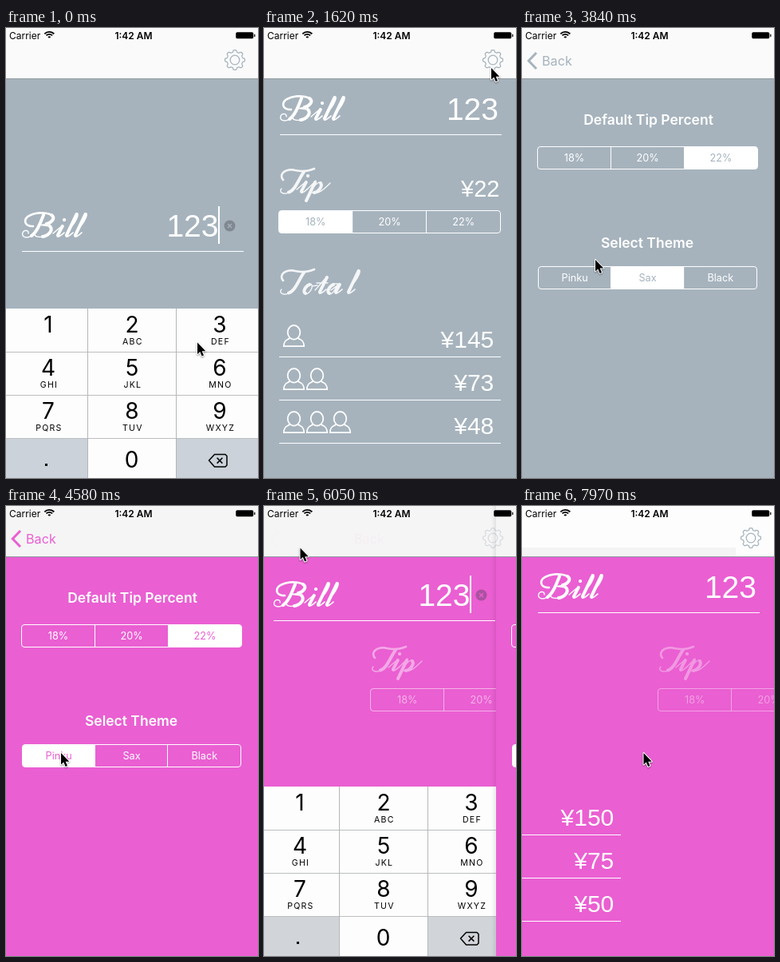
An HTML page with a canvas for the animation above (8 s loop, 316 by 563 pixels).

```html
<!DOCTYPE html>
<html lang="en">
<head>
<meta charset="utf-8">
<title>Tip calculator</title>
<style>
html, body { margin: 0; width: 100%; height: 100%; overflow: hidden; background: #a6b3bd; }
canvas { display: block; width: 316px; height: 563px; }
</style>
</head>
<body>
<canvas id="stage"></canvas>
<script>
const W = 316, H = 563, LOOP = 8000, TICK = 147.5;
const SAX = '#a6b3bd', PINK = '#ea5fd2', WHITE = '#fff';
const UI = 'Inter, Roboto, sans-serif', NUM = '"Liberation Sans", Arial, sans-serif';
const canvas = document.getElementById('stage');
const c = canvas.getContext('2d');
const dpr = window.devicePixelRatio || 1;
canvas.width = W * dpr;
canvas.height = H * dpr;

const PUSH = 12.4, TIP_CHOSEN = 22, THEME_CHOSEN = 29, THEMED = 30, POP = 38.4, BACK = 39, SECOND_TAP = 50;

// cubic-bezier(.42, 0, .58, 1)
function ease(x) {
  if (x <= 0) return 0;
  if (x >= 1) return 1;
  let lo = 0, hi = 1;
  for (let i = 0; i < 24; i++) {
    const u = (lo + hi) / 2, v = 1 - u;
    if (1.26 * u * v * v + 1.74 * u * u * v + u * u * u < x) lo = u; else hi = u;
  }
  return lo * lo * (3 - 2 * lo);
}

const span = (n, start, length) => ease((n - start) / length);

// Critically damped spring used by page transitions
function spring(t) {
  if (t <= 0) return 0;
  const rest = (1 + 1.6 * t) * Math.exp(-1.6 * t);
  return rest < .01 ? 1 : 1 - rest;
}

function text(s, x, y, font, color, align = 'center') {
  c.font = font;
  c.fillStyle = color;
  c.textAlign = align;
  c.fillText(s, x, y);
}

function rect(x, y, w, h, color) {
  c.fillStyle = color;
  c.fillRect(x, y, w, h);
}

function stroke(color, width) {
  c.strokeStyle = color;
  c.lineWidth = width;
  c.stroke();
}

function disc(x, y, r, color) {
  c.beginPath();
  c.arc(x, y, r, 0, 7);
  c.fillStyle = color;
  c.fill();
}

function shifted(x, y, alpha, draw) {
  if (alpha <= 0) return;
  c.save();
  c.translate(Math.round(x), Math.round(y));
  c.globalAlpha *= alpha;
  draw();
  c.restore();
}

// Script lettering: thin connecting lines plus heavy slanted stems, baseline at y = 0.
// Each word is rendered once so that fading does not reveal overlaps.
function lettering(draw) {
  const layer = document.createElement('canvas');
  layer.width = 260 * dpr;
  layer.height = 120 * dpr;
  const g = layer.getContext('2d');
  g.scale(2 * dpr, 2 * dpr);
  g.translate(0, 40);
  g.strokeStyle = WHITE;
  g.lineCap = g.lineJoin = 'round';
  const line = (d, w) => {
    g.lineWidth = w;
    g.stroke(new Path2D(d));
  };
  draw({
    thin: d => line(d, 1.4),
    mid: d => line(d, 2.6),
    heavy: d => line(d, 4),
    dot: (x, y) => line(`M${x} ${y}h.1`, 4),
    stem(x, h) {
      const top = x + .45 * h;
      line(`M${top} ${1 - h}L${x + 1} -3`, 4);
      line(`M${x} -3Q${x - .5} 2.5 ${x + 9} -6`, 1.6);
      line(h > 25 ? `M${x + 3} -9C${top + 1} -20 ${top + 4} ${-h - 2} ${top} ${-h}` : `M${x - 5} -5L${top} ${-h}`, 1.4);
    }
  });
  return layer;
}

function capitalT(pen) {
  pen.mid('M24 -17C18 -24 27 -32 39 -29C48 -27 56 -28 63 -31');
  pen.heavy('M50 -27C43 -17 39 -4 31 -1.5');
  pen.thin('M31 -1C24 2 18 -2 22 -6');
}

const words = {
  bill: lettering(pen => {
    pen.heavy('M47 -28C43 -18 39 -7 32 -2M57 -28C63 -24 56 -18 51 -17M55 -14C60 -9 53 -2 46 -1');
    pen.thin('M32 -2C25 2 19 -1 21 -6C23 -10 29 -9 28 -5M46 -1C41 0 36 -1 36 -4M51 -17L44 -15.5L55 -14');
    pen.mid('M34 -14C23 -13 20 -24 31 -28C40 -32 52 -31 57 -28');
    pen.stem(64, 15);
    pen.dot(73, -22);
    pen.stem(75, 30);
    pen.stem(86, 30);
  }),
  tip: lettering(pen => {
    capitalT(pen);
    pen.stem(46, 15);
    pen.dot(55, -22);
    pen.heavy('M64 -14L53 9M71 -13C74 -9 68 -2 63 -1');
    pen.thin('M55 -6L65 -16M60 -5Q67 -15 71 -14M60 -1C68 2 76 -6 83 -13');
  }),
  total: lettering(pen => {
    capitalT(pen);
    pen.heavy('M57 -12C52 -10 48 -3 52 -1');
    pen.thin('M52 0C57 0 64 -11 58 -13M60 -10L67 -11M66 -14H80');
    pen.stem(69, 22);
    pen.heavy('M87 -12C82 -10 78 -3 82 -1');
    pen.thin('M82 0C87 0 90 -8 93 -13H87');
    pen.stem(89, 13);
    pen.stem(105, 30);
  })
};

function script(name, baseline, alpha = 1) {
  shifted(0, baseline - 40, alpha, () => c.drawImage(words[name], 0, 0, 130, 60));
}

function segments(x, y, w, labels, chosen, bg) {
  const h = 28, third = w / 3;
  c.save();
  c.beginPath();
  c.roundRect(x, y, w, h, 3.5);
  c.clip();
  rect(x + third * chosen, y, third, h, WHITE);
  c.restore();
  c.beginPath();
  c.roundRect(x, y, w, h, 3.5);
  for (const i of [1, 2]) {
    const lx = Math.round(x + third * i) - .5;
    c.moveTo(lx, y);
    c.lineTo(lx, y + h);
  }
  stroke(WHITE, 1);
  labels.forEach((s, i) =>
    text(s, x + third * (i + .5), y + 18.5, '12.7px ' + UI, i === chosen ? bg : WHITE));
}

function person(x, y) {
  shifted(x, y, 1, () => {
    c.beginPath();
    c.ellipse(13.5, 8.8, 7.8, 8.8, 0, 0, 7);
    stroke(WHITE, 1.8);
    c.stroke(new Path2D('M8.5 15.5C7 18.5 .8 17 .8 26.2H26.2C26.2 17 20 18.5 18.5 15.5'));
  });
}

function cross(x, y, r, color, width) {
  c.beginPath();
  c.moveTo(x - r, y - r);
  c.lineTo(x + r, y + r);
  c.moveTo(x + r, y - r);
  c.lineTo(x - r, y + r);
  stroke(color, width);
}

function keypad(tint) {
  rect(-10, 351, W + 20, 212, '#fdfdfd');
  rect(-10, 514, 112, 49, tint);
  rect(214, 514, 112, 49, tint);
  for (let i = 0; i < 3; i++) rect(-10, 405 + 54 * i, W + 20, 1, '#bcbec0');
  for (const x of [102, 213]) rect(x, 351, 1, 212, '#b4b6b8');
  const hints = ['', 'ABC', 'DEF', 'GHI', 'JKL', 'MNO', 'PQRS', 'TUV', 'WXYZ'];
  const cols = [53, 158, 268];
  hints.forEach((hint, i) => {
    const x = cols[i % 3], y = 381 + 54 * Math.floor(i / 3);
    text(i + 1, x, y, '28px ' + UI, '#000');
    c.letterSpacing = '1.2px';
    text(hint, x + .9, y + 15, '10.6px ' + UI, '#000');
    c.letterSpacing = '0px';
  });
  text('0', 157.5, 550, '28px ' + UI, '#000');
  rect(49, 545, 3, 3, '#000');
  c.lineJoin = 'round';
  cross(268, 541.2, 3.4, '#000', 1.5);
  c.stroke(new Path2D('M254.5 541L261.5 533.5H275L277 535.5V547L275 549H261.5Z'));
}

function billRow(lift, editing, bg) {
  shifted(0, -146 * lift, 1, () => {
    script('bill', 261.5);
    text('123', editing ? 266.5 : 294, 260.8, '39px ' + NUM, WHITE, 'right');
    rect(20, 279, 278, 1, WHITE);
    if (!editing) return;
    rect(266, 223, 2, 47, WHITE);
    disc(280.5, 247.5, 7, 'rgba(60,60,70,.36)');
    cross(280.5, 247.5, 2.5, bg, 1.2);
  });
}

function mainView(n, bg) {
  const pink = n >= THEMED;
  const editing = n < 1 || (n >= BACK && n <= SECOND_TAP);
  const shown = span(n, 0, 9) - span(n, 38.9, 4.3) + span(n, SECOND_TAP, 9);
  const lift = span(n, 0, 3.5) - span(n, 40.53, 2.6) + span(n, SECOND_TAP, 3.5);
  const padDown = n < BACK ? span(n, 0, 2.6) : span(n, SECOND_TAP, 2.6);
  const bill = 123, tip = Math.round(bill * (pink ? .22 : .18));

  rect(-10, 0, W + 110, H, bg);
  shifted(256 * (1 - shown), 0, shown, () => {
    script('tip', 207, .88);
    text('¥' + tip, 295.5, 211, '29px ' + NUM, WHITE, 'right');
    segments(18.5, 228.5, 278, ['18%', '20%', '22%'], pink ? 2 : 0, bg);
  });
  shifted(-291 * (1 - shown), 0, 1, () => {
    script('total', 333, .88);
    for (let i = 0; i < 3; i++) {
      const y = 54 * i;
      const share = Math.round((bill + tip) / (i + 1));
      for (let j = 0; j <= i; j++) person(24 + 29 * j, 372 + y);
      text('¥' + share, 288.3, 399.5 + y, '30px ' + NUM, WHITE, 'right');
      rect(19, 411 + y, 278, 1, WHITE);
    }
  });
  billRow(lift, editing, bg);
  const tint = !pink ? '#cbd2da' : n < 43 ? '#d1d5d9' : '#d9cbe2';
  shifted(0, 212 * padDown, padDown < 1 ? 1 : 0, () => keypad(tint));
}

function settingsView(n, bg) {
  rect(0, 0, W, H, bg);
  text('Default Tip Percent', 158.5, 120.5, '600 17.5px ' + UI, WHITE);
  segments(19.5, 148.5, 276, ['18%', '20%', '22%'], n < TIP_CHOSEN ? 0 : 2, bg);
  text('Select Theme', 157, 275, '600 17.5px ' + UI, WHITE);
  segments(20.5, 298.5, 274, ['Pinku', 'Sax', 'Black'], n < THEME_CHOSEN ? 1 : 0, bg);
}

function gear(x, y) {
  c.beginPath();
  for (let i = 0; i < 160; i++) {
    const a = i / 80 * Math.PI;
    const r = 11.2 + 1.3 * Math.tanh(2.2 * Math.cos(8 * a));
    c.lineTo(x + r * Math.sin(a), y - r * Math.cos(a));
  }
  c.closePath();
  stroke(SAX, 1.3);
  c.beginPath();
  c.arc(x, y, 5.8, 0, 7);
  stroke(SAX, 1.3);
}

function statusBar() {
  text('Carrier', 4, 13.5, '12px ' + UI, '#000', 'left');
  text('1:42 AM', 160, 13.5, '600 12px ' + UI, '#000');
  for (const r of [8.2, 5.2, 1.7]) {
    c.beginPath();
    c.arc(54.3, 13, r, -Math.PI * .76, -Math.PI * .24);
    stroke('#000', 1.8);
  }
  c.beginPath();
  c.roundRect(288.5, 5.5, 21.5, 7.5, 1.5);
  c.fillStyle = '#000';
  c.fill();
  stroke('rgba(0,0,0,.5)', 1);
  rect(311.2, 7.8, 1.2, 3.2, '#000');
}

function navBar(n, push, bg) {
  rect(0, 0, W, 63, n < THEMED ? '#fafafa' : n < 42 ? '#f5f5f5' : '#fdfdfd');
  if (n >= 45) rect(0, 52, 268, 11, '#f4f4f4');
  rect(0, 63, W, 1, '#8f989f');
  shifted(0, 0, (1 - push) ** 12, () => gear(287, 40));
  shifted(96 * (1 - push), 0, push ** 1.2, () => text('Back', 25, 47, '16.2px ' + UI, bg, 'left'));
  shifted(0, 0, push * push, () => {
    c.lineWidth = 3;
    c.strokeStyle = bg;
    c.stroke(new Path2D('M18 31L8.3 41L18 51'));
  });
  statusBar();
}

const arrow = new Path2D('M0 0V14.5L3.3 11.5L5.6 17L8 16L5.7 10.7H10.3Z');

// Pointer moves: start tick, length, destination
const moves = [
  [0, 1, 232, 320], [8, 3, 285, 50], [16, 2, 209.5, 183], [18, 2, 247, 161],
  [23, 4, 69, 309], [32, 5, 45.5, 52.5], [44, 5, 152.5, 309]
];

function pointer(n) {
  let x = 240, y = 393.5;
  for (const [start, length, toX, toY] of moves) {
    const p = span(n, start, length);
    x += (toX - x) * p;
    y += (toY - y) * p;
  }
  c.save();
  c.translate(x, y);
  c.lineJoin = 'round';
  c.lineWidth = 2;
  c.strokeStyle = WHITE;
  c.shadowColor = 'rgba(0,0,0,.4)';
  c.shadowBlur = 2 * dpr;
  c.shadowOffsetY = dpr;
  c.stroke(arrow);
  c.shadowColor = 'transparent';
  c.fillStyle = '#000';
  c.fill(arrow);
  c.restore();
}

function pageShadow(x) {
  const shade = c.createLinearGradient(x - 6, 0, x, 0);
  shade.addColorStop(0, 'rgba(0,0,0,0)');
  shade.addColorStop(1, 'rgba(0,0,0,.08)');
  rect(x - 6, 0, 6, H, shade);
}

function draw(t) {
  const n = Math.floor(t / TICK + .07);
  const bg = n < THEMED ? SAX : PINK;
  const push = spring(n - PUSH) - spring(n - POP);
  const edge = Math.round(W * (1 - push));
  c.setTransform(dpr, 0, 0, dpr, 0, 0);
  if (push < 1) shifted(-95 * push, 0, 1, () => mainView(n, bg));
  if (push > 0) shifted(edge, 0, 1, () => settingsView(n, bg));
  navBar(n, push, bg);
  if (push > 0 && push < 1) pageShadow(edge);
  pointer(n);
}

function loop() {
  draw(performance.now() % LOOP);
  requestAnimationFrame(loop);
}
loop();
</script>
</body>
</html>
```
